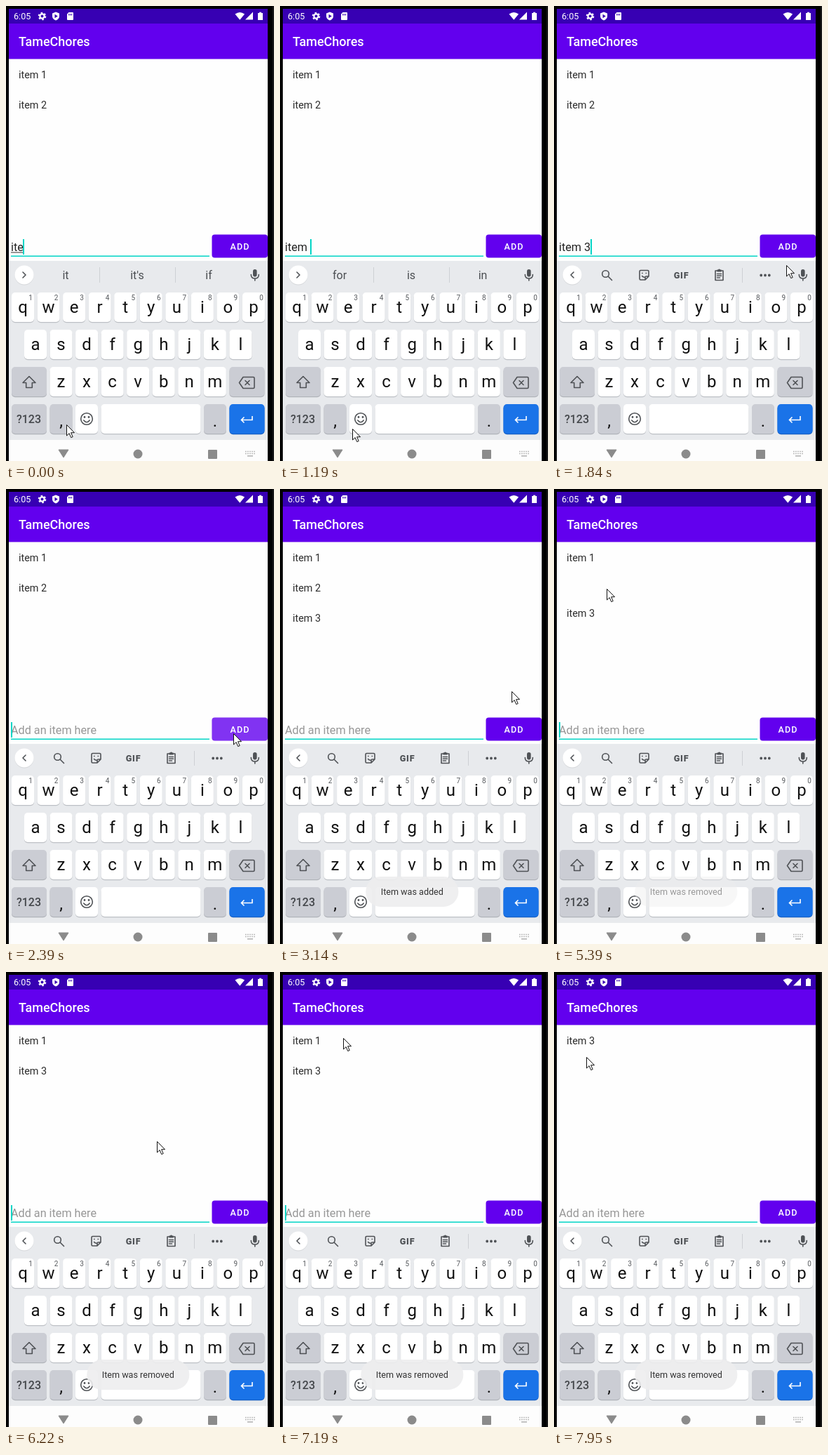
Write an HTML page that moves like this. It is 382 px wide and 648 px high and loops after 8 s.

```html
<!DOCTYPE html>
<html lang="en">
<head>
<meta charset="utf-8">
<title>To-do list</title>
<style>
  html, body { margin: 0; width: 100%; height: 100%; overflow: hidden; background: #000; }
  svg { display: block; }
  text { font-family: Roboto, "Open Sans", sans-serif; white-space: pre; }
  .mid { text-anchor: middle; }
  .bold { font-weight: 500; }
  .row { font-size: 14.4px; fill: #2b2b2b; }
  .line { fill: none; stroke: #4f5256; stroke-width: 1.6; stroke-linejoin: round; stroke-linecap: round; }
  .ink { fill: #4f5256; }
  .letter { font-size: 24px; fill: #111; }
  .digit { font-size: 10px; fill: #55585c; }
  .word { font-size: 16px; fill: #4b4e52; }
  .toast { font-size: 12.6px; fill: #333; }
</style>
</head>
<body>
<svg width="382" height="648" viewBox="0 0 382 648">
  <rect width="382" height="648"/>
  <rect x="380" width="2" height="648" fill="#1a1a1a"/>
  <rect x="4" y="4" width="369" height="644" fill="#fefefe"/>
  <rect x="4" y="25" width="369" height="50.500" fill="#6200ee"/>
  <rect x="4" y="4" width="369" height="21" fill="#3700b3"/>

  <g fill="#fff">
    <text x="11" y="19" font-size="12.6">6:05</text>
    <g transform="translate(51.500 14.500)" fill="none" stroke="#fff" stroke-width="2.200">
      <circle r="3.100"/>
      <circle r="4.700" stroke-dasharray="2.460"/>
    </g>
    <path d="M71 8.500l5 2v4q0 4.200-5 6q-5-1.800-5-6v-4z"/>
    <path d="M69.500 11.800v5.400l4.300-2.700z" fill="#3700b3"/>
    <path d="M89.500 9h5.500q1 0 1 1v9q0 1-1 1h-7q-1 0-1-1v-7.500z"/>
    <path d="M89.700 11v2.500M91.700 11v2.500M93.700 11v2.500" stroke="#3700b3"/>
    <path d="M326.500 11.500q6.800-5 13.600 0l-6.800 8.300z"/>
    <path d="M341 19.500h11v-11z"/>
    <path d="M361 8.700h3v1.300h2v10h-7v-10h2z"/>
  </g>
  <text class="bold" x="18" y="57" font-size="18" fill="#fff">TameChores</text>

  <text class="row" id="item1" x="18" y="102.500">item 1</text>
  <text class="row" id="item2" x="18" y="145.500">item 2</text>
  <text class="row" id="item3" x="18" y="188.500">item 3</text>

  <rect x="7" y="355.500" width="283" height="1.500" fill="#03d5c6"/>
  <text id="field" x="7" y="349" font-size="16.2"></text>
  <rect id="under" x="7" y="350.500" height="1" fill="#333"/>
  <rect id="caret" y="332" width="2" height="22" fill="#03d5c6"/>

  <rect x="293.500" y="325.500" width="79.500" height="33" rx="4" fill="#6200ee"/>
  <rect id="glow" x="293.500" y="325.500" width="79.500" height="33" rx="4" fill="#fff"/>
  <text class="bold" x="319.500" y="347" font-size="12.6" letter-spacing="1.1" fill="#fff">ADD</text>

  <rect x="4" y="363" width="369" height="255" fill="#e8eaed"/>
  <circle cx="26" cy="384" r="13.500" fill="#d5d7da"/>
  <circle cx="26" cy="383" r="13.500" fill="#fff"/>
  <path id="chevron" class="line" d="M-2 -4L2 0L-2 4"/>

  <g id="words">
    <path d="M133.500 372v22M241.500 372v22" stroke="#cdd0d4"/>
    <text class="word mid" x="85" y="389"></text>
    <text class="word mid" x="187" y="389"></text>
    <text class="word mid" x="289" y="389"></text>
  </g>
  <g id="tools">
    <circle class="line" cx="73.500" cy="381.500" r="4.800"/>
    <path class="line" d="M77.300 385.300l5.200 5.200"/>
    <path class="line" d="M123.500 376.500h10q1.500 0 1.500 1.500v7l-5 5h-6.500q-1.500 0-1.500-1.500v-10.500q0-1.500 1.500-1.500zM130 390v-3.500q0-1.500 1.500-1.500h3.500M125.500 384.500q2 2.500 4.500 1.500"/>
    <path class="ink" d="M125 379.700h1.600v1.600h-1.600zM130.500 379.700h1.600v1.600h-1.600z"/>
    <text class="mid ink" x="181.500" y="387.500" font-size="12.6" font-weight="800" letter-spacing=".8">GIF</text>
    <path class="line" d="M230 377h11v13.500h-11zM232.500 381.500h6M232.500 384.300h6M232.500 387h4"/>
    <path class="ink" d="M232.500 375.500h1.500q1.500-2 3 0h1.500v3h-6z"/>
    <path d="M268.500 373v21" stroke="#cdd0d4"/>
    <path class="line" d="M295.200 383.500h0M301 383.500h0M306.800 383.500h0" style="stroke-width:3.800"/>
  </g>
  <rect class="ink" x="352" y="375" width="5.600" height="10.500" rx="2.800"/>
  <path class="line" d="M349.300 382.500q0 5.500 5.500 5.500t5.500-5.500M354.800 388v3"/>

  <g id="keys"></g>

  <path class="line" d="M33 527.500l9 9h-4.700v7h-8.600v-7h-4.700z"/>
  <path class="line" d="M338 528.500h14.500q1.500 0 1.500 1.500v13q0 1.500-1.500 1.500h-14.500l-5.500-8zM341 533.500l6 6M347 533.500l-6 6"/>
  <path class="line" d="M351 584v5.500h-15M339.500 585.500l-4 4l4 4" style="stroke:#fff;stroke-linecap:butt;stroke-linejoin:miter"/>
  <text class="mid bold" x="32.500" y="594" font-size="16" fill="#44474b">?123</text>
  <text class="mid letter" x="78.500" y="599">,</text>
  <text class="mid letter" x="298" y="599">.</text>
  <circle class="line" cx="115" cy="588" r="8.300"/>
  <path class="line" d="M110.800 590q4.200 5.500 8.400 0"/>
  <path class="line" d="M112 585.500h0M118 585.500h0" style="stroke-width:2.800"/>

  <rect x="4" y="618" width="369" height="30" fill="#fdfdfd"/>
  <g fill="#8b8b8b">
    <path d="M75 632h14l-7 11z" stroke="#8b8b8b" stroke-linejoin="round"/>
    <circle cx="188" cy="638" r="6.500"/>
    <rect x="288" y="632" width="13" height="13" rx="1"/>
  </g>
  <g stroke="#b4b4b4" stroke-width="1.600">
    <path d="M341 634.500h14M341 637.500h14" stroke-dasharray="1.700 1.350"/>
    <path d="M344 640.800h8"/>
  </g>

  <g id="toast">
    <rect id="pill" y="552" height="43" rx="21.500" fill="#eeeeef" opacity=".9"/>
    <text id="note" class="toast mid" x="188.300" y="578"></text>
  </g>

  <path id="mouse" d="M.5 .5v15.500l3.600-3.400l2.600 6l2.500-1l-2.600-5.900h4.900z" fill="#fff" stroke="#111"/>
</svg>
<script>
const LOOP = 8000, TICK = 125, SLACK = 10, BLINK = 490, PITCH = 43;
const $ = id => document.getElementById(id);
const set = (el, attrs) => { for (const k in attrs) el.setAttribute(k, attrs[k]); };
const show = (id, on) => set($(id), { visibility: on ? 'visible' : 'hidden' });

function make(tag, attrs, text = '') {
  const el = document.createElementNS('http://www.w3.org/2000/svg', tag);
  set(el, attrs);
  el.textContent = text;
  $('keys').append(el);
}

function key(x, y, w, fill = '#fff', shade = '#bdc0c5') {
  const box = { x, width: w, height: 42, rx: 5 };
  make('rect', { ...box, y: y + 1.2, fill: shade });
  make('rect', { ...box, y, fill });
}

function letters(str, x0, y, digits = '') {
  [...str].forEach((ch, i) => {
    const x = x0 + i * 36.55;
    key(x, y, 32);
    make('text', { x: x + 16, y: y + 29, class: 'letter mid' }, ch);
    if (digits) make('text', { x: x + 27, y: y + 11, class: 'digit mid' }, digits[i]);
  });
}

const GREY = ['#cbcdd4', '#b0b3b9'];
letters('qwertyuiop', 8, 408, '1234567890');
letters('asdfghjkl', 26, 461);
letters('zxcvbnm', 62.5, 514);
key(8, 514, 50, ...GREY);
key(318.5, 514, 50, ...GREY);
key(8, 567, 50, ...GREY);
key(62.5, 567, 32, ...GREY);
key(99, 567, 32);
key(135.5, 567, 142);
key(282, 567, 32, ...GREY);
key(318.5, 567, 50, '#1a73e8', '#1660c4');

// 0 to 1 in n even jumps, one per screen refresh, the first at `from`.
function ramp(t, from, n) {
  const i = Math.floor((t - from + SLACK) / TICK) + 1;
  return Math.min(Math.max(i, 0), n) / n;
}
const ease = p => (1 - Math.cos(Math.PI * p)) / 2;

// A removed row fades, then the rows below slide up.
const fade = (t, from) => 1 - ramp(t, from, 2);
const slide = (t, from) => PITCH * ease(ramp(t, from + 120, 4));

const CLICK = 2140, CLEAR = 2270, REMOVE2 = 5240, REMOVE1 = 7450;

const typing = [
  { from: 0, text: 'ite', picks: ['it', "it's", 'if'] },
  { from: 250, text: 'item', picks: ['item', "item's", 'items'] },
  { from: 740, text: 'item ', picks: ['for', 'is', 'in'] },
  { from: 1450, text: 'item 3', picks: ['for', 'is', 'in'] },
  { from: 1710, text: 'item 3' },
  { from: CLEAR, text: '' }
];
const toasts = [
  { from: 0, text: '' },
  { from: 2630, text: 'Item was added' },
  { from: REMOVE2, text: 'Item was removed' },
  { from: REMOVE1 + 120, text: 'Item was removed' }
];
const latest = (list, t) => list.findLast(s => s.from <= t);

// Mouse moves: start, jumps, end x, end y
const home = [86, 596];
const moves = [
  [1190, 1, 103, 602], [1310, 1, 145, 510], [1450, 4, 331, 369], [1990, 2, 324, 348],
  [3020, 2, 330, 288], [3290, 2, 132, 277], [3960, 3, 75, 142], [5510, 3, 221, 241],
  [5940, 1, 215, 241], [6360, 2, 143, 152], [6630, 3, 90, 94], [7830, 2, 46, 121]
];

function drawMouse(t) {
  let [x, y] = home;
  for (const [from, n, tx, ty] of moves) {
    const p = ramp(t, from, n);
    x += (tx - x) * p;
    y += (ty - y) * p;
  }
  set($('mouse'), { transform: `translate(${Math.round(x)} ${Math.round(y)})` });
}

function drawField(t) {
  const { from, text, picks } = latest(typing, t);
  const field = $('field');
  field.textContent = text;
  const width = text ? Math.floor(field.getComputedTextLength()) : 0;
  field.textContent = text || 'Add an item here';
  set(field, { fill: text ? '#222' : '#979797' });
  set($('under'), { width: t < 740 ? width : 0 });
  set($('caret'), { x: 7 + width });
  show('caret', Math.floor((t - from) / BLINK) % 2 === 0);

  show('words', picks);
  show('tools', !picks);
  set($('chevron'), { transform: `translate(26 383) scale(${picks ? 1 : -1} 1)` });
  $('words').querySelectorAll('text').forEach((el, i) => { el.textContent = picks ? picks[i] : ''; });
}

function drawToast(t) {
  const { from, text } = latest(toasts, t);
  $('note').textContent = text;
  const width = $('note').getComputedTextLength() + 43;
  set($('pill'), { x: 188.3 - width / 2, width });
  set($('toast'), { opacity: text ? ramp(t, from, 4) - ramp(t, from + 1970, 3) : 0 });
}

function draw(t) {
  drawMouse(t);
  drawField(t);
  drawToast(t);
  set($('glow'), { opacity: 0.2 * (ramp(t, CLICK, 3) - ramp(t, 2510, 2)) });
  set($('item1'), { opacity: fade(t, REMOVE1) });
  set($('item2'), { opacity: fade(t, REMOVE2) });
  const up = slide(t, REMOVE2) + slide(t, REMOVE1);
  set($('item3'), { opacity: ramp(t, 2510, 2), transform: `translate(0 ${-up})` });
}

const start = performance.now();
function tick() {
  draw((performance.now() - start) % LOOP);
  requestAnimationFrame(tick);
}
tick();
</script>
</body>
</html>
```
